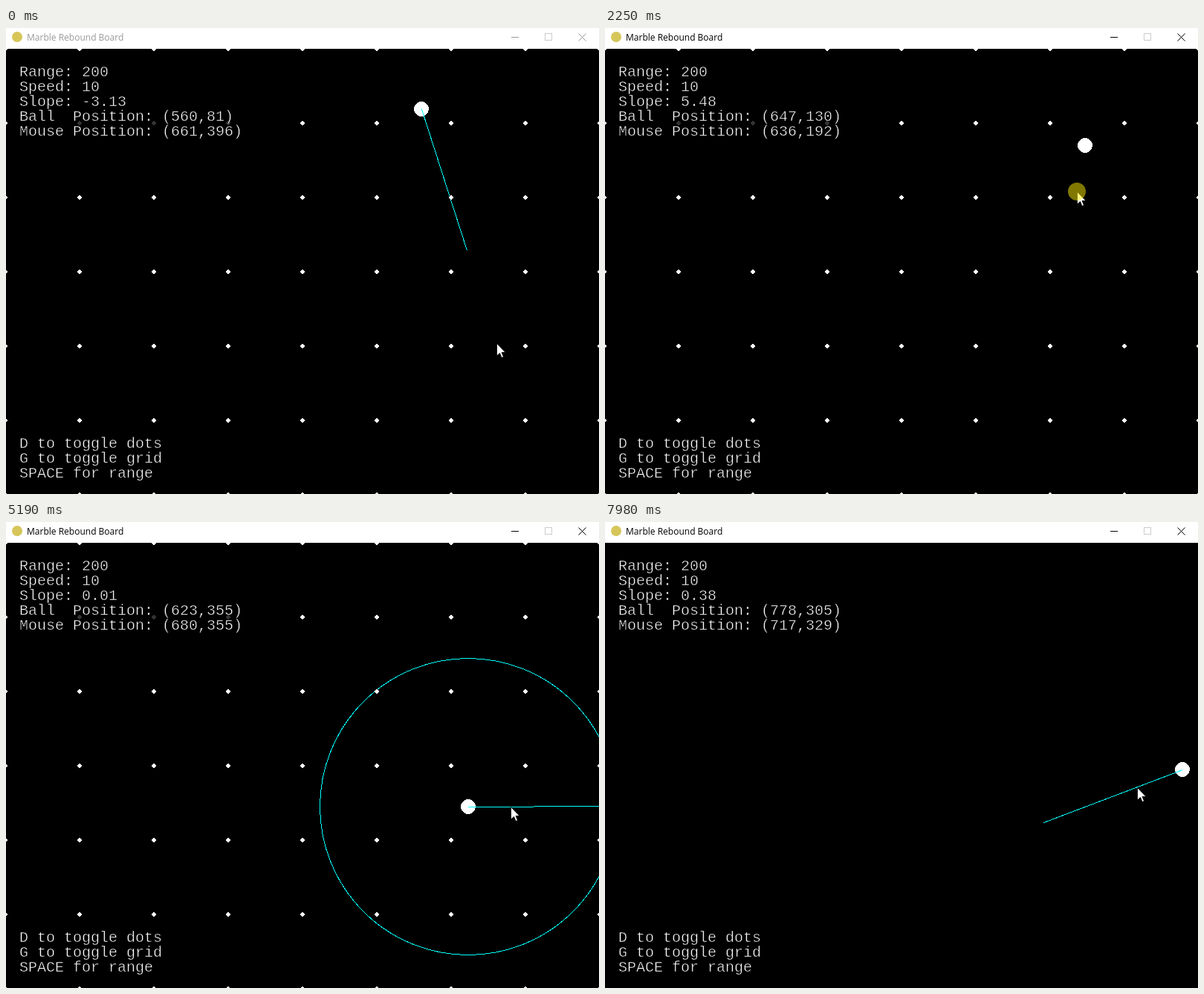
Write an HTML page that moves like this. It is 798 px wide and 627 px high and loops after 8 s.

```html
<!DOCTYPE html>
<html>
<head>
<meta charset="utf-8">
<style>
  html, body { margin: 0; width: 100%; height: 100%; overflow: hidden; background: #000; }
  svg { display: block; }
  .crisp { shape-rendering: crispEdges; }
  .info { font: 20px "Liberation Mono", monospace; fill: #fff; stroke: #000; stroke-width: .5px; white-space: pre; }
  .title { font: 12px "Open Sans", "Noto Sans", sans-serif; }
</style>
</head>
<body>
<svg width="798" height="627" viewBox="0 0 798 627">
  <rect width="798" height="627"/>
  <g class="crisp">
    <path id="grid" stroke="#fff"/>
    <circle id="ball" r="10" fill="#fff"/>
    <g fill="none" stroke="#0ff">
      <circle id="ring" r="199.5"/>
      <polyline id="line"/>
    </g>
    <g id="dots" fill="#fff"></g>
  </g>
  <g id="rows"></g>
  <rect width="798" height="28" fill="#fff"/>
  <circle cx="15" cy="12" r="7" fill="#d6c65a"/>
  <g id="chrome">
    <text class="title" x="28" y="17">Marble Rebound Board</text>
    <path class="crisp" d="M680 12.5h10" stroke="currentColor"/>
    <path d="M770.5 7.5l10 10m0-10l-10 10" stroke="currentColor"/>
  </g>
  <rect x="725.5" y="7.5" width="9" height="9" fill="none" stroke="#ccc"/>
  <path id="cursor" d="M0 0V16.5L4 13L6.5 19L9 18L6.5 12H11.5Z" fill="#fff" stroke="#000" stroke-width=".8"/>
  <circle id="press" r="12" fill="#fff000" fill-opacity=".5"/>
</svg>
<script>
const LOOP = 8000, RANGE = 200, SPEED = 10, RADIUS = 10, FPS = 60;
const W = 800, H = 600, OX = -1, OY = 28;
const $ = id => document.getElementById(id);

// Click time and number of steps the ball then travels
const clicks = [[1135, 20], [2166, 21], [2922, 20], [3645, 20], [6830, 20]];

// Mouse stops: arrive, leave, x, y
const stops = [
  [0, 0, 661, 396], [220, 220, 650, 115], [370, 620, 600, 8], [920, 1480, 586, 34],
  [2100, 2300, 636, 192], [2850, 2960, 513, 314], [3640, 3650, 682, 361],
  [3950, 4000, 682, 362], [4410, 6510, 680, 355], [6810, 7300, 695, 337],
  [7670, LOOP, 717, 329]
];

const within = (t, a, b) => t >= a && t < b;
const show = (el, on) => el.setAttribute('visibility', on ? 'visible' : 'hidden');
const set = (el, attrs) => { for (const k in attrs) el.setAttribute(k, attrs[k]); };

function add(parent, tag, attrs) {
  const el = document.createElementNS('http://www.w3.org/2000/svg', tag);
  set(el, attrs);
  return parent.appendChild(el);
}

function mouseAt(t) {
  const i = stops.findIndex(s => s[1] > t);
  const [arrive, , x, y] = stops[i];
  if (t >= arrive) return [x, y];
  const [, leave, px, py] = stops[i - 1];
  const k = (t - leave) / (arrive - leave), ease = k * k * (3 - 2 * k);
  return [Math.round(px + (x - px) * ease), Math.round(py + (y - py) * ease)];
}

// Replay every click: the ball steps towards the mouse and bounces off the walls
function ballAt(t) {
  let x = 560.3, y = 81, moving = false;
  for (const [start, steps] of clicks) {
    if (t < start) break;
    const [mx, my] = mouseAt(start), len = Math.hypot(mx - x, my - y);
    const done = Math.min(steps, Math.floor((t - start) * FPS / 1000));
    let vx = SPEED * (mx - x) / len, vy = SPEED * (my - y) / len;
    for (let i = 0; i < done; i++) {
      x += vx;
      y += vy;
      if (x < 0 || x > W - RADIUS) vx = -vx;
      if (y < 0 || y > H - RADIUS) vy = -vy;
    }
    moving = done < steps;
  }
  return {x, y, moving};
}

// Aim line of fixed length, reflected at the walls
function aimPoints(x, y, mx, my) {
  const len = Math.hypot(mx - x, my - y) || 1;
  let dx = (mx - x) / len, dy = (my - y) / len, left = RANGE;
  const pts = [[x, y]];
  while (left > 0.01) {
    const toX = dx > 0 ? (W - x) / dx : dx < 0 ? -x / dx : Infinity;
    const toY = dy > 0 ? (H - y) / dy : dy < 0 ? -y / dy : Infinity;
    const d = Math.min(left, Math.max(0, toX), Math.max(0, toY));
    x += dx * d;
    y += dy * d;
    left -= d;
    pts.push([x, y]);
    if (d === toX) dx = -dx;
    if (d === toY) dy = -dy;
    if (d === 0) break;
  }
  return pts.map(([px, py]) => [Math.trunc(px) + OX + .5, Math.trunc(py) + OY + .5]).join(' ');
}

let gridPath = '';
for (let x = OX; x < W; x += 100) {
  gridPath += `M${x + .5} ${OY}V627`;
  for (let y = OY; y <= H + OY; y += 100) add($('dots'), 'circle', {cx: x, cy: y, r: 2.7});
}
for (let y = OY; y < H + OY; y += 100) gridPath += `M0 ${y + .5}H798`;
set($('grid'), {d: gridPath});

// Five status rows at the top, three help rows at the bottom
const rows = Array.from({length: 8}, (_, i) => {
  const y = (i < 5 ? 65 : 465) + i * 20;
  return {
    back: add($('rows'), 'rect', {x: 18, y: y - 16, height: 20, 'fill-opacity': .8}),
    text: add($('rows'), 'text', {x: 18, y, class: 'info'})
  };
});

function draw(clock) {
  const t = clock % LOOP;
  const ball = ballAt(t), [mx, my] = mouseAt(t);
  const bx = Math.trunc(ball.x), by = Math.trunc(ball.y);
  const center = {cx: bx + OX, cy: by + OY};
  const slope = -(my - ball.y) / (mx - ball.x);

  set($('ball'), center);
  set($('ring'), center);
  show($('line'), !ball.moving);
  if (!ball.moving) set($('line'), {points: aimPoints(ball.x, ball.y, mx, my)});
  show($('ring'), !ball.moving && within(t, 1700, 6830));
  show($('dots'), !within(t, 4730, 5190) && t < 7980);
  show($('grid'), within(t, 5820, 6510));

  [`Range: ${RANGE}`, `Speed: ${SPEED}`, `Slope: ${slope.toFixed(2)}`,
    `Ball  Position: (${bx},${by})`, `Mouse Position: (${mx},${my})`,
    'D to toggle dots', 'G to toggle grid', 'SPACE for range'
  ].forEach((s, i) => {
    rows[i].text.textContent = s;
    set(rows[i].back, {width: s.length * 12});
  });

  const ink = t < 620 ? '#999' : '#000';
  set($('chrome'), {fill: ink, color: ink});
  set($('cursor'), {transform: `translate(${mx + OX + .5} ${my + OY + .5})`});
  set($('press'), {cx: mx + OX, cy: my + OY});
  show($('press'), clicks.some(([c]) => within(t, c - 40, c + 150)));
}

let start;
function tick(now) {
  start ??= now;
  draw(now - start);
  requestAnimationFrame(tick);
}
draw(0);
requestAnimationFrame(tick);
</script>
</body>
</html>
```
